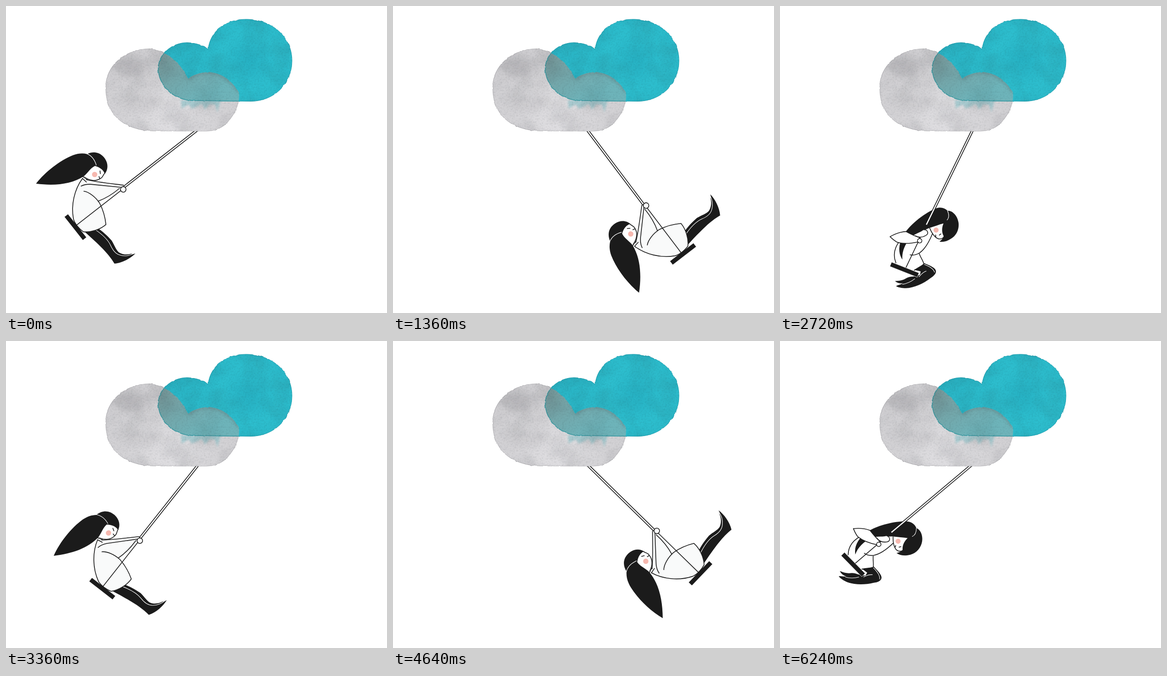
An HTML page for the animation above (6320 ms loop, 802x646 px).

```html
<!DOCTYPE html>
<html lang="en">
<head>
<meta charset="utf-8">
<title>Cloud swing</title>
<style>
  html, body { margin: 0; width: 100%; height: 100%; overflow: hidden; background: #fff; }
  svg { position: absolute; left: 0; top: 0; width: 802px; height: 646px; }
  #clouds { will-change: transform; }
  .ink { fill: #1b1b1b; }
  .line { fill: none; stroke: #1b1b1b; stroke-width: 1.6; stroke-linecap: round; stroke-linejoin: round; }
  .cloth { fill: #f9fafa; }
  .white { fill: #fff; }
  .thin { fill: none; stroke: #fff; stroke-width: 1.1; }
  .cheek { fill: #f6b8af; }
</style>
</head>
<body>
<svg viewBox="0 0 802 646">
  <!-- Each figure hangs straight down from the pivot; inner groups undo the angle at which it is drawn. -->
  <g id="forward">
    <g transform="rotate(.8 407 258)">
      <path class="ink" d="M440 556C455 551 467 549 481 548C492 549 502 553 510 551C521 547 527 537 529 530L529 535L533 525C535 539 532 559 523 573C500 570 472 574 430 582Z"/>
      <path class="thin" d="M440 562C460 555 475 553 488 556C500 559 510 558 517 552C526 545 529 537 531 527"/>
      <path class="cloth" d="M337 513L350 510L403 458L410 466L403 520C420 522 434 529 447 537C448 553 441 572 430 585C420 588 406 588 396 584C370 571 348 545 340 518Z"/>
      <path class="line" d="M340 517C348 545 370 571 396 584C406 588 420 587 430 584C441 572 448 553 447 537C434 529 420 523 403 520C386 519 370 524 363 531"/>
      <path class="line" d="M347 512C364 498 386 475 404 457M351 529C352 522 355 517 360 511L406 462M404 468C405 488 402 507 398 520M337 514L349 510M340 517L351 515"/>
      <path class="white" d="M331 478L360 472C360 478 365 482 363 488C362 499 353 508 341 513L333 509Z"/>
      <path class="line" d="M360 473C360 478 365 482 363 488C362 499 353 508 340 512"/>
      <path class="ink" d="M305 478C309 461 321 453 336 454C350 455 359 464 361 474C354 471 344 473 335 480C333 490 337 499 338 511C336 543 316 574 289 601C281 570 281 532 289 503C293 491 298 484 305 478Z"/>
      <path class="thin" d="M304 478C314 472 326 473 336 477"/>
      <circle class="cheek" cx="349" cy="491.5" r="5.6"/>
      <path class="line" d="M350 478L355 481M358 487L362 488"/>
    </g>
    <path class="line" style="fill:#fff" d="M404.700 256L402.900 458H407L408.800 256Z"/>
    <path class="line" d="M406.500 468L405.700 586"/>
    <circle class="line" style="fill:#fff" cx="407.8" cy="463" r="5.8"/>
    <rect class="ink" x="376.4" y="586.6" width="62" height="9.2"/>
  </g>

  <g id="backward">
    <g transform="rotate(26.1 407 258)">
      <path class="ink" d="M566 514C576 509 584 503 592 503C600 504 601 513 600 522C600 541 595 562 585 576C580 582 576 587 569 590C569 585 573 580 573 575C569 581 565 584 559 585C565 577 568 571 569 562C571 552 579 547 581 535L576 530L565 539Z"/>
      <path class="thin" d="M569 515C580 509 588 505 596 508M583 540C582 533 580 528 583 520M574 577C580 567 581 557 581 549"/>
      <path class="white" d="M514 459L531 461C538 475 544 493 544 509L568 515L565 540L530 560C513 555 502 543 497 520L497 500Z"/>
      <path class="line" d="M529 462C537 476 545 494 544 508C543 516 540 522 535 526M544 509C552 512 561 512 568 515C569 524 568 532 566 539M497 519C501 541 512 555 530 560"/>
      <path class="white" d="M517 425L548 440C550 447 550 453 547 457C539 463 525 462 515 458Z"/>
      <path class="line" d="M549 446C550 453 547 458 542 460C533 463 523 461 516 459"/>
      <path class="ink" d="M510 407C516 398 532 397 544 404C556 411 563 424 561 438C560 448 557 455 551 460C551 454 550 449 547 446C539 445 531 439 526 430C522 439 519 450 515 460C511 477 507 490 506 502C511 522 520 537 533 545C516 544 502 532 493 510C486 491 483 454 491 424C494 414 501 408 510 407Z"/>
      <path class="thin" d="M510 407C518 409 524 413 525 420"/>
      <circle class="cheek" cx="527.5" cy="451" r="5.3"/>
      <path class="line" d="M540 448V452M535 458L538 460"/>
    </g>
    <rect class="line" style="fill:#fff" x="405" y="256" width="4" height="228"/>
    <path class="line" d="M407 484L408 586"/>
    <g transform="rotate(26.1 407 258)">
      <path class="line" style="fill:#fff" d="M511 471C516 464 525 467 523 476C522 484 517 490 510 493"/>
      <path class="line" style="fill:#fff" d="M479 536C481 523 486 510 491 503C502 498 512 493 519 488L524 496C517 511 507 524 498 531C492 534 486 535 479 536Z"/>
      <circle class="line" style="fill:#fff" cx="524" cy="492" r="4.6"/>
    </g>
    <rect class="ink" x="376" y="583.5" width="62" height="9.8" transform="rotate(-4.5 407 588)" stroke="#fff" stroke-width=".7"/>
  </g>
</svg>

<svg id="clouds" viewBox="0 0 802 646">
  <defs>
    <path id="grayShape" d="M210 170C210 126 250 90 304 90C345 97 370 124 383 153C392 146 408 139 428 139C455 141 476 158 490 181C494 203 480 232 462 249C450 259 435 263.5 420 263.5L310 263C248 261 209 229 210 170Z"/>
    <path id="tealShape" d="M425.500 91C430 52 463 28 505 28C560 28 602 65 602 115C602 164 564 200.500 515 200.500L392 199C347 196 320.500 164 320.500 130C322 100 350 77 382 77C400 78 416 83 425.500 91Z"/>
    <clipPath id="inGray"><use href="#grayShape"/></clipPath>
    <radialGradient id="gray" gradientUnits="userSpaceOnUse" cx="345" cy="238" r="180">
      <stop offset="0" stop-color="#e1e0e3"/><stop offset=".5" stop-color="#d5d4d7"/><stop offset="1" stop-color="#cecdd0"/>
    </radialGradient>
    <radialGradient id="teal" gradientUnits="userSpaceOnUse" cx="512" cy="114" r="200">
      <stop offset="0" stop-color="#27b3c5"/><stop offset=".3" stop-color="#2dbece"/><stop offset=".5" stop-color="#2bb9c9"/><stop offset="1" stop-color="#2ab5c6"/>
    </radialGradient>
    <linearGradient id="mix" gradientUnits="userSpaceOnUse" x1="350" y1="105" x2="400" y2="200">
      <stop offset="0" stop-color="#789d9f"/><stop offset="1" stop-color="#6eb4ba"/>
    </linearGradient>
    <filter id="paint" filterUnits="userSpaceOnUse" x="190" y="10" width="430" height="270" color-interpolation-filters="sRGB">
      <feTurbulence type="fractalNoise" baseFrequency=".09" numOctaves="3" seed="4" result="rough"/>
      <feDisplacementMap in="SourceGraphic" in2="rough" scale="3" xChannelSelector="R" yChannelSelector="G" result="shape"/>
      <feTurbulence type="fractalNoise" baseFrequency=".02" numOctaves="6" seed="9"/>
      <feColorMatrix values="0 0 0 0 .1  0 0 0 0 .12  0 0 0 0 .14  .22 0 0 0 -.085"/>
      <feComposite operator="in" in2="shape" result="stain"/>
      <feTurbulence type="fractalNoise" baseFrequency=".3" numOctaves="2" seed="2"/>
      <feColorMatrix values="0 0 0 0 .1  0 0 0 0 .12  0 0 0 0 .14  .2 0 0 0 -.09"/>
      <feComposite operator="in" in2="shape" result="grain"/>
      <feMerge><feMergeNode in="shape"/><feMergeNode in="stain"/><feMergeNode in="grain"/></feMerge>
    </filter>
    <filter id="soft" x="-50%" y="-80%" width="200%" height="260%"><feGaussianBlur stdDeviation="9"/></filter>
    <filter id="drip" x="-20%" y="-40%" width="140%" height="180%"><feGaussianBlur stdDeviation="2"/></filter>
    <clipPath id="flatBase"><path d="M0 0H802V263.800H0Z"/></clipPath>
  </defs>
  <g clip-path="url(#flatBase)">
    <g filter="url(#paint)">
      <use href="#grayShape" fill="url(#gray)" stroke="#aaa9ac" stroke-width=".8"/>
      <g clip-path="url(#inGray)">
        <ellipse cx="262" cy="128" rx="40" ry="20" fill="#a3a1a5" opacity=".25" filter="url(#soft)"/>
        <ellipse cx="282" cy="208" rx="40" ry="14" fill="#a3a1a5" opacity=".2" filter="url(#soft)"/>
        <path d="M368 198H452L445 224L440 208L430 206L419 217L412 206L392 216L384 207L370 216Z" fill="#75b9c1" opacity=".5" filter="url(#drip)"/>
      </g>
      <use href="#tealShape" fill="url(#teal)" stroke="#199fb0" stroke-width="1"/>
      <g clip-path="url(#inGray)">
        <use href="#tealShape" fill="url(#mix)" stroke="#3f9ba3" stroke-width="1.600"/>
        <path d="M383 153C392 146 408 139 428 139C455 141 476 158 490 181" fill="none" stroke="#6b8f91" stroke-width="9" opacity=".45" filter="url(#drip)"/>
      </g>
    </g>
  </g>
</svg>

<script>
const STEP = 80, LOOP = 6320;
const forward = document.getElementById('forward');
const backward = document.getElementById('backward');

// [step, swing angle in degrees], positive to the right
const swing = [[0, -51.6], [19, 48.1], [20, 46.9], [38, -46.9], [39, -50.6],
               [40, -48.4], [58, 46.1], [59, 49.7], [60, 43.2], [78, -50]];

function angleAt(step) {
  const i = Math.max(1, swing.findIndex(([s]) => s >= step));
  const [s0, a0] = swing[i - 1], [s1, a1] = swing[i];
  return a0 + (a1 - a0) * (step - s0) / (s1 - s0);
}

function render(ms) {
  const step = Math.floor((ms % LOOP) / STEP);
  const goingForward = step < 20 || (step >= 39 && step < 60);
  const turn = `rotate(${-angleAt(step)} 407 258)`;
  for (const [figure, shown] of [[forward, goingForward], [backward, !goingForward]]) {
    figure.setAttribute('display', shown ? 'inline' : 'none');
    figure.setAttribute('transform', turn);
  }
}

let start;
function tick(now) {
  start ??= now;
  render(now - start);
  requestAnimationFrame(tick);
}
render(0);
requestAnimationFrame(tick);
</script>
</body>
</html>
```
